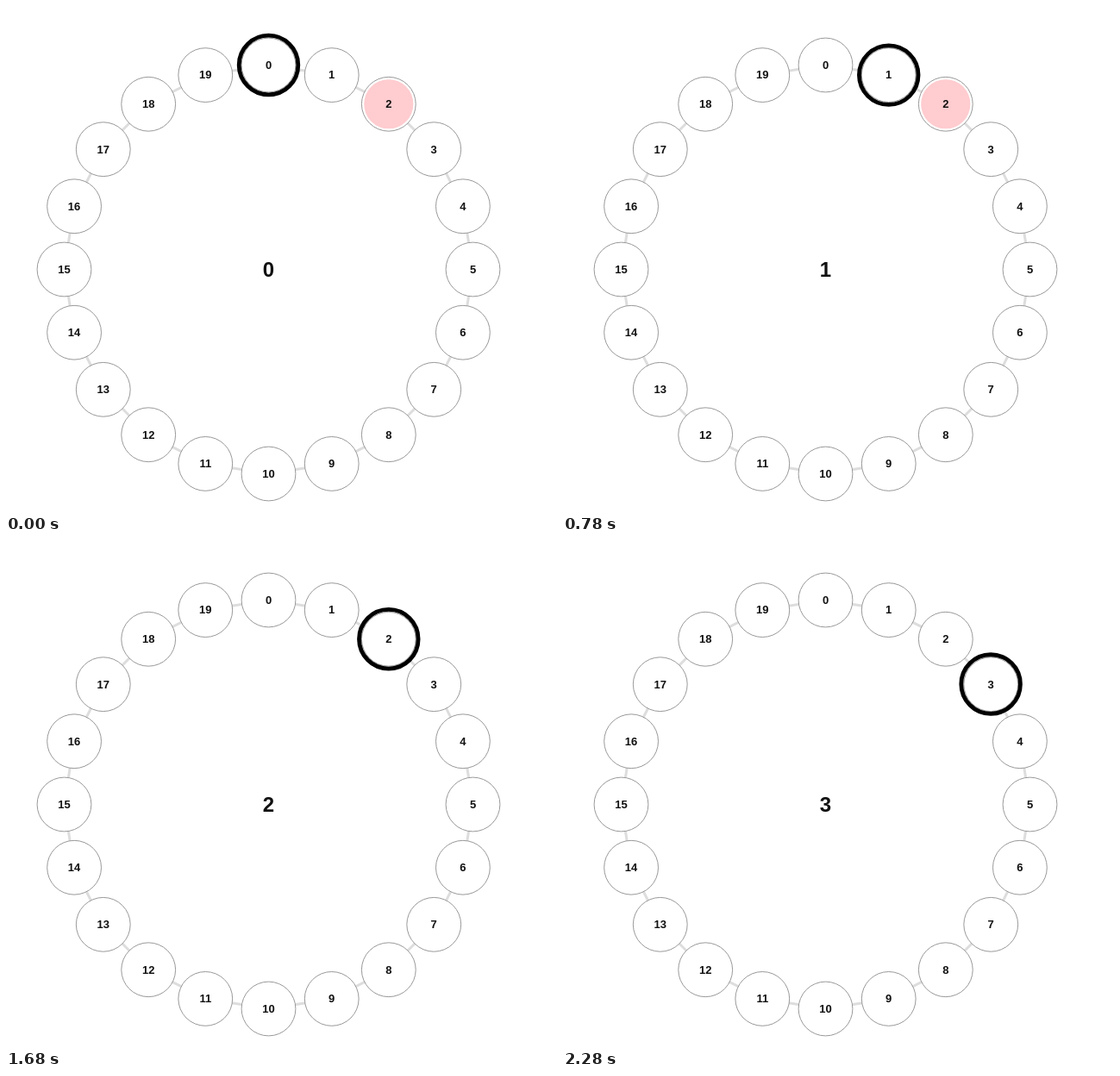
An HTML page for the animation above (2460 ms loop, 639 px wide and 588 px high).

```html
<!DOCTYPE html>
<html lang="en">
<head>
<meta charset="utf-8">
<title>Ring walk</title>
<style>
  html, body { margin: 0; width: 100%; height: 100%; overflow: hidden; background: #fff; }
  svg { display: block; width: 639px; height: 588px; }
  text { font: bold 13px "Liberation Sans", Arial, sans-serif; text-anchor: middle; fill: #111; }
  #count { font-size: 24px; }
  .link { stroke: #ddd; stroke-width: 3; }
  .node { fill: #fff; stroke: #999; stroke-width: 1; }
  #mark { fill: #ffcccf; }
  #cursor { fill: none; stroke: #000; stroke-width: 4.8; }
</style>
</head>
<body>
<svg id="stage" viewBox="0 0 639 588"></svg>
<script>
const NODES = 20, CX = 304.5, CY = 305.5, R = 237;
const LOOP = 2460, TICK = 60;
const MOVES = [60, 960, 1860];   // start of each hop, ms
const OMEGA = 0.0193;            // spring rate per ms
const FADE = [1020, 1500];
const MARKED = 2;

const stage = document.getElementById("stage");

function add(tag, attrs, text) {
  const el = document.createElementNS("http://www.w3.org/2000/svg", tag);
  for (const key in attrs) el.setAttribute(key, attrs[key]);
  if (text !== undefined) el.textContent = text;
  return stage.appendChild(el);
}

function place(i) {
  const a = i * 2 * Math.PI / NODES;
  return [CX + R * Math.sin(a), CY - R * Math.cos(a)];
}

for (let i = 0; i < NODES; i++) {
  const [x1, y1] = place(i), [x2, y2] = place(i + 1);
  add("line", { class: "link", x1, y1, x2, y2 });
}

let mark;
for (let i = 0; i < NODES; i++) {
  const [cx, cy] = place(i);
  add("circle", { class: "node", cx, cy, r: 31.4 });
  if (i === MARKED) mark = add("circle", { id: "mark", cx, cy, r: 28.6 });
  add("text", { x: cx, y: cy + 4.4 }, i);
}

const count = add("text", { id: "count", x: CX, y: 314 }, 0);
const cursor = add("circle", { id: "cursor", r: 34.3 });

// Critically damped spring from 0 to 1
function spring(ms) {
  const u = OMEGA * Math.max(0, ms);
  return 1 - (1 + u) * Math.exp(-u);
}

function draw(t) {
  const pos = MOVES.reduce((sum, start) => sum + spring(t - start), 0);
  const [x, y] = place(pos);
  cursor.setAttribute("cx", x);
  cursor.setAttribute("cy", y);
  count.textContent = MOVES.filter(start => t >= start).length;
  const faded = (t - FADE[0]) / (FADE[1] - FADE[0]);
  mark.setAttribute("opacity", 1 - Math.min(1, Math.max(0, faded)));
}

const begin = performance.now();
function frame() {
  const t = (performance.now() - begin) % LOOP;
  draw(Math.floor(t / TICK) * TICK);
  requestAnimationFrame(frame);
}
draw(0);
requestAnimationFrame(frame);
</script>
</body>
</html>
```
